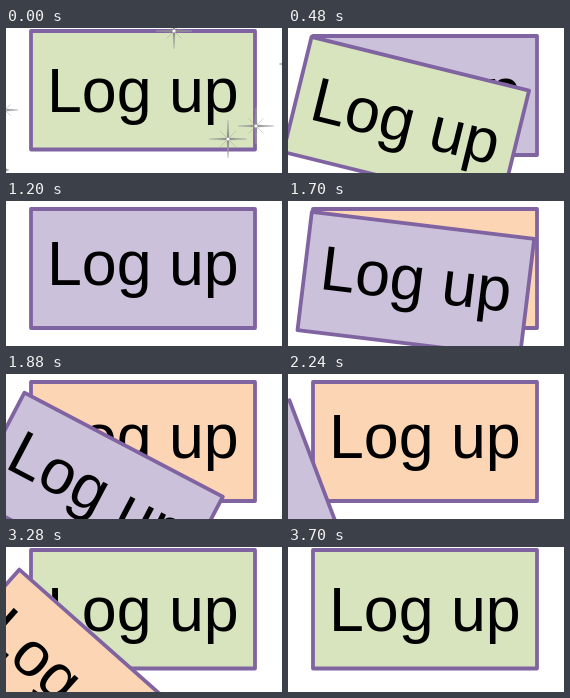
An HTML page for the animation above (3.76 s loop, 276 px wide and 145 px high).

```html
<!DOCTYPE html>
<html lang="en">
<head>
<meta charset="utf-8">
<title>Log up</title>
<style>
  html, body { margin: 0; width: 100%; height: 100%; overflow: hidden; background: #fff; }
  svg { display: block; width: 100%; height: 100%; }
  rect { stroke: #8064a2; stroke-width: 3.8; stroke-linejoin: round; }
  text { font: 62.7px "Liberation Sans", Arial, sans-serif; text-anchor: middle; }
</style>
</head>
<body>
<svg viewBox="0 0 276 145">
  <g id="cards"></g>
  <g id="sparkles"></g>
</svg>
<script>
const LOOP = 3760, STEP = 60, TURN_STEPS = 13, SPARKLE_STEP = 140;
const TURN_STARTS = [420, 1700, 2980];
const CARDS = [
  { fill: '#d7e4bd', top: 3, height: 118.5 },
  { fill: '#ccc1da', top: 8, height: 119 },
  { fill: '#fcd5b5', top: 8, height: 119 }
];
// x, y, ray length, phase
const STARS = [
  [168, 3, 18, 0], [222, 111, 19, 0], [250, 98, 18, 0],
  [-1, 82, 13, 0], [278, 36, 5, 1], [-1, 142, 4, 1]
];
const PULSE = [1, 0.7, 0.4];

const cardLayer = document.getElementById('cards');
const sparkleLayer = document.getElementById('sparkles');

function add(parent, tag, attrs) {
  const node = document.createElementNS('http://www.w3.org/2000/svg', tag);
  for (const name in attrs) node.setAttribute(name, attrs[name]);
  return parent.appendChild(node);
}

const cards = CARDS.map(({ fill, top, height }) => {
  const group = add(cardLayer, 'g', {});
  add(group, 'rect', { x: 25, y: top, width: 224, height, fill });
  add(group, 'text', { x: 136.8, y: 83.5 }).textContent = 'Log up';
  return group;
});

function starPath(r) {
  const w = 1.1;
  return `M0 ${-r}L${w} ${-w}L${r} 0L${w} ${w}L0 ${r}L${-w} ${w}L${-r} 0L${-w} ${-w}Z`;
}

const stars = STARS.map(([, , r]) => {
  const group = add(sparkleLayer, 'g', {});
  const d = r * 0.42;
  add(group, 'path', {
    d: `M${-d} ${-d}L${d} ${d}M${d} ${-d}L${-d} ${d}`,
    stroke: '#999', 'stroke-width': 0.6, opacity: 0.7
  });
  add(group, 'path', { d: starPath(r), fill: '#858585', stroke: '#aaa', 'stroke-width': 0.4 });
  add(group, 'circle', { r: Math.min(1.6, r / 8), fill: '#fff' });
  return group;
});

// Each card swings a quarter turn around the stage's top left corner.
function render(time) {
  const t = time % LOOP;
  const turn = TURN_STARTS.filter(start => t >= start).length - 1;
  const step = turn < 0 ? 0 : Math.floor((t - TURN_STARTS[turn]) / STEP) + 1;
  const base = (turn + 1) % cards.length;
  const falling = turn >= 0 && step < TURN_STEPS ? turn : -1;

  cards.forEach((card, i) => {
    card.style.display = i === base || i === falling ? '' : 'none';
    card.setAttribute('transform', `rotate(${i === falling ? step * 90 / TURN_STEPS : 0})`);
  });
  if (falling >= 0 && cardLayer.lastChild !== cards[falling]) {
    cardLayer.appendChild(cards[falling]);
  }

  sparkleLayer.style.display = turn < 0 ? '' : 'none';
  const beat = Math.floor(t / SPARKLE_STEP);
  stars.forEach((star, i) => {
    const [x, y, , phase] = STARS[i];
    const scale = PULSE[(beat + phase) % PULSE.length] / PULSE[phase];
    star.setAttribute('transform', `translate(${x} ${y}) scale(${scale})`);
  });
}

const origin = performance.now();
function tick() {
  render(performance.now() - origin);
  requestAnimationFrame(tick);
}
tick();
</script>
</body>
</html>
```
